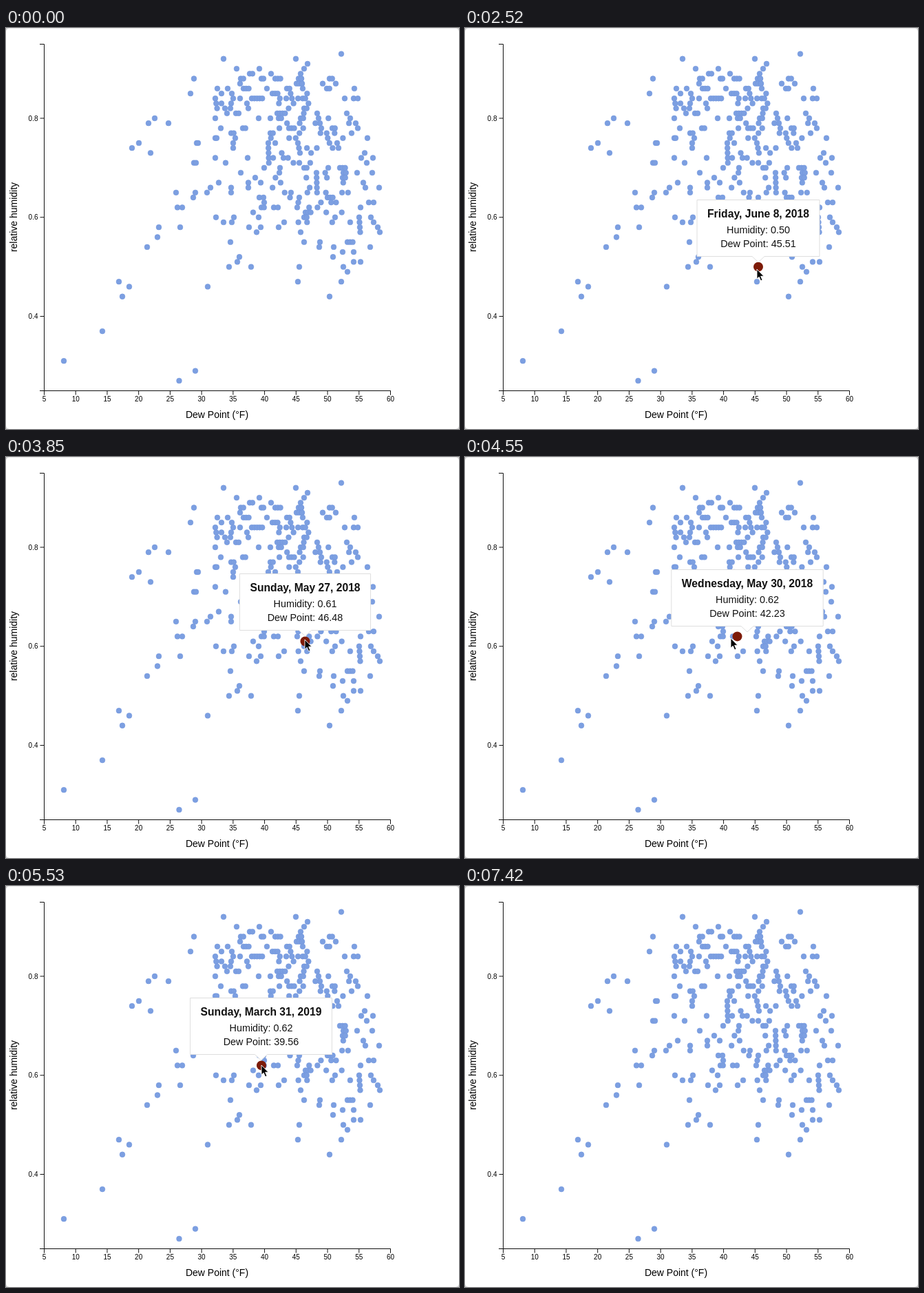
Animation of 658 by 582 pixels, one loop 7.98 s. Source, as an HTML page:

```html
<!DOCTYPE html>
<html lang="en">
<head>
<meta charset="utf-8">
<title>Humidity and dew point</title>
<style>
  html, body { margin: 0; width: 100%; height: 100%; overflow: hidden; background: #d4d4d4; }
  svg { display: block; width: 658px; height: 582px; font-family: "Liberation Sans", Arial, sans-serif; }
  .tick { font-size: 10px; }
  .label { font-size: 14px; text-anchor: middle; }
  .axis { fill: none; stroke: #111; }
  #dots { fill: #7c9fe1; stroke: #7094dc; stroke-width: .5; }
  #hot { fill: #7d1b08; }
  #box { fill: #fff; stroke: #dedede; }
  #tip text { text-anchor: middle; font-size: 14.4px; fill: #111; }
  #tip .title { font-size: 15.7px; font-weight: bold; }
</style>
</head>
<body>
<svg viewBox="0 0 658 582">
  <rect y=".6" width="658" height="581.4" rx="5" fill="#fff"/>
  <g id="axes">
    <path class="axis" d="M49 23.5H55.5V526.5H49M55.5 532.5V526.5H558.5V532.5"/>
    <text class="label" x="306.5" y="566">Dew Point (°F)</text>
    <text class="label" transform="translate(15.5 274.5) rotate(-90)">relative humidity</text>
  </g>
  <g id="dots"></g>
  <circle id="hot" r="7"/>
  <g id="tip">
    <path id="box"/>
    <text class="title" y="-65"></text>
    <text y="-42"></text>
    <text y="-22"></text>
  </g>
  <path id="cursor" d="M0 0V14.2L3.2 11.2L5.6 16.8L8 15.8L5.6 10.3H10Z" fill="#000" stroke="#fff" stroke-width=".9"/>
</svg>
<script>
const LOOP = 7980, STEP = 70;
const $ = id => document.getElementById(id);
const yOf = pct => 131 + (80 - pct) * 7.188;

function add(parent, tag, attrs, text = '') {
  const el = document.createElementNS('http://www.w3.org/2000/svg', tag);
  for (const k in attrs) el.setAttribute(k, attrs[k]);
  el.textContent = text;
  parent.append(el);
  return el;
}

// Axis ticks
for (let v = 5; v <= 60; v += 5) {
  const x = 55.5 + (v - 5) * 9.1455;
  add($('axes'), 'path', { class: 'axis', d: `M${x} 526.5v6` });
  add($('axes'), 'text', { class: 'tick', x, y: 542, 'text-anchor': 'middle' }, v);
}
for (const v of [40, 60, 80]) {
  add($('axes'), 'path', { class: 'axis', d: `M55.5 ${yOf(v)}h-6` });
  add($('axes'), 'text', { class: 'tick', x: 46.5, y: yOf(v) + 3.6, 'text-anchor': 'end' }, (v / 100).toFixed(1));
}

// Scatter: edge points by humidity from 93% down, then runs, then a seeded fill of the core
const edge = [
  [487], [316, 421], [438], [335, 368, 433], [354, 358, 385], [273, 371, 374], [340, 460, 479],
  [307, 322, 379, 506], [268, 313, 328], [330, 340, 492, 505, 511], [313, 327, 350],
  [318, 326, 352], [321, 334, 338], [216, 304, 367, 500], [207, 236, 508], [312, 511], [502],
  [304, 306, 333, 525], [193, 277, 279, 330], [183, 330], [210, 521], [304, 351, 516, 533],
  [273, 276, 319, 524], [375], [341, 510, 532], [362], [309, 352, 370, 519],
  [297, 327, 352, 522, 542], [247, 275, 292, 327], [272, 368], [527, 534],
  [249, 256, 389, 395, 515], [359], [305, 331, 367, 530], [316, 328, 404, 534],
  [222, 253, 353, 370, 396, 540], [364, 428, 543], [220], [326, 433, 456],
  [205, 455, 476, 529], [489, 505], [339, 475], [336, 505, 515], [324, 356, 426, 490],
  [496], [], [164, 424, 487], [179, 293], [], [169, 470]
];
const stray = [[140, 37], [84, 31], [275, 29], [251.5, 27]];
const across = [ // x, humidity, count
  [357, 84, 5], [345, 86, 3], [341, 88, 2], [391, 88, 3], [425, 88, 2], [422, 87, 3],
  [387, 85, 3], [408, 86, 2], [431, 84, 2], [433, 82, 2], [394, 81, 4], [396, 80, 2],
  [428, 80, 2], [411, 78, 3], [466, 86, 2], [470, 88, 2], [474, 78, 2], [344, 78, 2],
  [327, 77, 2], [384, 77, 2], [485, 70, 3], [490, 69, 2], [489, 68, 2], [467, 64, 3],
  [371, 62, 2], [435, 61, 3], [433, 60, 2], [496, 55, 3], [433, 70, 2]
];
const down = [ // x, humidity, count, drift
  [304, 84, 3, 1.3], [428, 89, 4, 1], [452, 81, 4, 2], [381, 75, 5, .2], [424, 75, 3, 1.5],
  [451, 69, 5, .2], [426, 64, 3, -1.5], [513, 60, 4, .5], [481, 75, 2, 2], [374, 64, 2, 1]
];
const pts = [];
const dot = (x, pct) => pts.push([x, yOf(pct)]);
edge.forEach((row, i) => row.forEach(x => dot(x, 93 - i)));
stray.forEach(p => dot(...p));
for (const [x, pct, n] of across) for (let i = 0; i < n; i++) dot(x + i * 3.8, pct);
for (const [x, pct, n, dx] of down) for (let i = 0; i < n; i++) dot(x + i * dx, pct - i);

let seed = 29;
const rnd = () => (seed = seed * 16807 % 2147483647) / 2147483647;
for (let n = 0, tries = 0; n < 72 && tries < 3000; tries++) {
  const x = 384 + rnd() * 116, pct = 59 + Math.floor(rnd() * 27), y = yOf(pct);
  if (pct < 64 && x < 420) continue;
  if (pct > 81 && x > 440) continue;
  if (pts.some(p => Math.hypot(p[0] - x, p[1] - y) < 6.5)) continue;
  dot(x, pct);
  n++;
}
pts.forEach(([cx, cy]) => add($('dots'), 'circle', { cx, cy, r: 3.9 }));

// Hovered days: start time, dot x, humidity, dew point, date
const days = [
  [1260, 275.5, 29, '29.10', 'Wednesday, March 20, 2019'],
  [1470, 426, 50, '45.51', 'Friday, June 8, 2018'],
  [2590, 293, 46, '31.05', 'Tuesday, April 30, 2019'],
  [3570, 434.5, 61, '46.48', 'Sunday, May 27, 2018'],
  [4410, 395.5, 62, '42.23', 'Wednesday, May 30, 2018'],
  [4620, 389, 62, '41.47', 'Monday, May 28, 2018'],
  [5110, 371, 62, '39.56', 'Sunday, March 31, 2019']
];
// Tracks: time, then values
const tipTrack = [
  [1260, 219, 341], [1330, 252, 429], [1400, 275, 490], [1470, 275, 490], [1610, 426, 340],
  [2520, 426, 340], [2800, 293, 368], [3500, 293, 368], [3780, 434.5, 260], [4340, 434.5, 260],
  [4550, 410, 254], [4690, 389, 253], [5040, 389, 253], [5250, 370.5, 253]
];
const fadeTrack = [[1190, 0], [1330, .87], [1400, 1], [6790, 1], [7000, 0]];
const cursorTrack = [
  [560, 334, 553], [770, 384, 470], [1260, 384, 470], [1330, 385, 448], [1680, 424, 350],
  [2520, 424, 350], [3010, 297, 376], [3150, 297, 376], [3290, 325, 366], [3850, 434, 265],
  [3990, 434, 265], [4550, 386, 263], [4830, 386, 263], [5530, 371, 260], [6720, 371, 260],
  [7210, 350, 584]
];

function sample(track, t) {
  const i = track.findIndex(k => k[0] > t);
  if (i < 0) return track[track.length - 1].slice(1);
  if (i === 0) return track[0].slice(1);
  const a = track[i - 1], b = track[i];
  const u = (t - a[0]) / (b[0] - a[0]), e = u * u * (3 - 2 * u);
  return a.slice(1).map((v, j) => v + (b[j + 1] - v) * e);
}
const place = (el, [x, y]) => el.setAttribute('transform', `translate(${x} ${y})`);

const [title, humid, dew] = $('tip').querySelectorAll('text');
let shown = null;
function show(day) {
  if (day === shown) return;
  shown = day;
  const [, x, pct, point, date] = day;
  title.textContent = date;
  humid.textContent = `Humidity: ${(pct / 100).toFixed(2)}`;
  dew.textContent = `Dew Point: ${point}`;
  const w = title.getComputedTextLength() / 2 + 15;
  $('box').setAttribute('d', `M${-w} -90.5H${w}V-8.5H9L0 0L-9 -8.5H${-w}Z`);
  place($('hot'), [x, yOf(pct)]);
}

function draw(t) {
  const fade = sample(fadeTrack, t)[0];
  const on = t >= 1260 && fade > 0;
  $('tip').style.display = on ? '' : 'none';
  $('hot').style.display = on ? '' : 'none';
  if (on) {
    show(days.filter(d => d[0] <= t).pop());
    $('tip').setAttribute('opacity', fade);
    place($('tip'), sample(tipTrack, t));
  }
  $('cursor').style.display = t >= 560 && t < 7210 ? '' : 'none';
  place($('cursor'), sample(cursorTrack, t));
}

const start = performance.now();
function tick() {
  const t = (performance.now() - start) % LOOP;
  draw(Math.floor(t / STEP) * STEP);
  requestAnimationFrame(tick);
}
tick();
</script>
</body>
</html>
```
